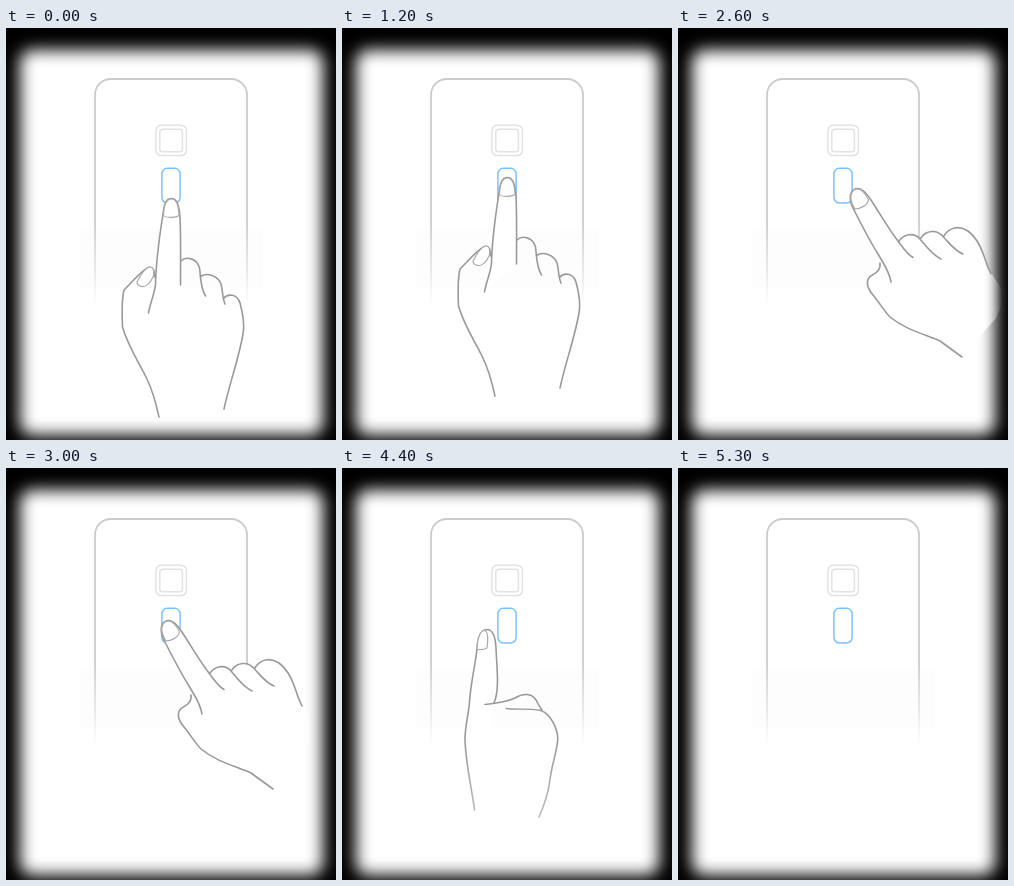
These frames come from a looping animation (330 by 412 pixels, 5400 ms). An HTML page:

```html
<!DOCTYPE html>
<html lang="en">
<head>
<meta charset="utf-8">
<title>Fingerprint enrolment</title>
<style>
  html, body {
    margin: 0;
    width: 100%;
    height: 100%;
    overflow: hidden;
    background: #000;
  }
  .glow {
    position: absolute;
    left: 14px;
    top: 22px;
    width: 303px;
    height: 385px;
    border-radius: 12px;
    background: #fff;
    filter: blur(8px);
  }
  svg {
    position: absolute;
    left: 0;
    top: 0;
    display: block;
  }
  path, rect {
    fill: none;
    stroke-linecap: round;
    stroke-linejoin: round;
  }
  .haze { fill: #fdfdfd; }
  .hand path {
    stroke: #999;
    stroke-width: 1.6;
  }
  .hand .skin { fill: #fff; }
  .hand .cover { fill: url(#cover); stroke: none; }
  .hand .nail { stroke: #aaa; stroke-width: 1.2; fill: #fff; }
  .hand .crease { stroke-width: 1.3; }
  .edge .wrist { stroke: url(#wrist); }

  /* Each hand taps twice in its third of the loop, then fades out. */
  .hand { animation: tap 5400ms step-end infinite; }
  .front { --shift: translate(0, -21px); }
  .side { --shift: translate(-17px, -8px); animation-delay: -3600ms; }
  .edge { --shift: translate(22px, -5px); animation-delay: -1800ms; }

  @keyframes tap {
    0% { opacity: 1; transform: none; }
    7.4074% { opacity: 1; transform: var(--shift); }
    14.8148% { opacity: 1; transform: none; }
    22.2222% { opacity: 1; transform: var(--shift); }
    29.6296% { opacity: .5; transform: var(--shift); }
    31.4814%, 100% { opacity: 0; transform: none; }
  }
</style>
</head>
<body>
<div class="glow"></div>
<svg width="330" height="412" viewBox="0 0 330 412">
  <defs>
    <linearGradient id="fade" gradientUnits="userSpaceOnUse" x1="0" y1="195" x2="0" y2="278">
      <stop offset="0" stop-color="#cbcbcb"/>
      <stop offset="1" stop-color="#cbcbcb" stop-opacity="0"/>
    </linearGradient>
    <linearGradient id="wrist" gradientUnits="userSpaceOnUse" x1="0" y1="270" x2="0" y2="349">
      <stop offset="0" stop-color="#999"/>
      <stop offset="1" stop-color="#bbb"/>
    </linearGradient>
    <linearGradient id="cover" gradientUnits="userSpaceOnUse" x1="304" y1="0" x2="324" y2="0">
      <stop offset="0" stop-color="#fff"/>
      <stop offset="1" stop-color="#fff" stop-opacity="0"/>
    </linearGradient>
  </defs>

  <rect class="haze" x="73" y="201" width="184" height="59"/>
  <path d="M89 278V67A16 16 0 0 1 105 51H225A16 16 0 0 1 241 67V278" stroke="url(#fade)" stroke-width="1.8"/>
  <g stroke="#e2e2e2" stroke-width="1.5">
    <rect x="150" y="97.3" width="30.3" height="30.3" rx="5"/>
    <rect x="153.8" y="101.2" width="22.6" height="22.6" rx="3"/>
  </g>
  <rect x="155.900" y="140.300" width="18.200" height="34.700" rx="5.500" stroke="#80c0f8" stroke-width="1.5"/>

  <g class="hand front">
    <path class="skin" d="M142.500 285C144 275 149 265 149.500 256C150 235 154 205 157 186C158 176 160 170.500 165.500 170.500C171 170.500 173 177 174 189C175 210 174.500 235 174.500 257"/>
    <path class="nail" d="M157.500 187C158 177 160.500 171 165.500 171C170.500 171 172.500 178 173 187Q172.500 189 165 189.300Q158 189.500 157.500 187Z"/>
    <path d="M175 233C180 228 191 230 193.500 240C195 250 194 259 199.500 268"/>
    <path d="M194.500 248.500C201 244 212 248 215 256C217 263 216 269 219 276"/>
    <path d="M217.500 270.500C222 265 231 266 234 275C237 286 239 296 237 306C233 330 223 357 218 381"/>
    <path d="M148.500 249C149 243 147 238.500 142.500 239.500C135 243 126 254 118 262C115.500 272 116 288 116.500 299C122 318 132 333 140 349C146 361 150 375 153 389"/>
    <path class="nail" d="M131 254C134 248 139 240 144 239C148 239 148.500 245 147 249C144 256 139 260 134 258Q131 257 131 254Z"/>
  </g>

  <g class="hand side">
    <path class="cover" d="M190 167L220 214Q231 203 242 211Q254 199 265 209Q277 193 291 204Q305 218 310 240L328 268L318 290L284 329C257 313 226 305 212 289L190 260Q190 248 202 239Z"/>
    <path class="skin" d="M213 254C211 242 205 235 200 226C190 210 181 192 174 178C170 168 173 160.500 180 160.500C185 160.500 189 166 193 172C204 189 212 203 220 213C225 220 229 226 235 229.500"/>
    <path class="nail" d="M173 172C172 165 175 161 179.500 161C184 161 188 167 190.500 172C190 177 182 181 177 181Q174.500 178 173 172Z"/>
    <path d="M220.500 213.500C226 206 236 204 242 211C248 218 254 227 263 231"/>
    <path d="M242.500 210.500C248 202 259 201 265.500 209C272 216 277 223 285 226"/>
    <path d="M265.500 208.500C271 199 281 197 290 203C298 209 303 219 306 228Q309 238 313 246"/>
    <path d="M202 235C203 243 197 245 192 248.500C187 254 190 261 195 267C201 274 206 283 212 289C228 302 246 306 262 313Q273 321 284 329"/>
  </g>

  <g class="hand edge">
    <path class="skin wrist" d="M132.500 342C130 322 123.500 295 123 271C123 258 126.500 247 127.500 234C128.500 216 133 199 135 181C135.500 170 138 162 145 161.500C151 161.500 153.500 170 154 180C154.500 196 158 222 152 235"/>
    <path class="nail" d="M135 181C135 172 138 162.500 142.500 162.500C146.500 163 146 173 145 180Q140 182.500 135 181Z"/>
    <path d="M143 236.500C153 235.500 165 234 173 230C181 225 190 225 194 232Q197 238 200 242"/>
    <path class="crease" d="M164 240.500C174 242 186 240 199 242.500"/>
    <path class="wrist" d="M199 242.500C208 246 215.500 259 215.800 271C215 284 209 299 207.500 315C205 331 201 340 197 349"/>
  </g>
</svg>
</body>
</html>
```
